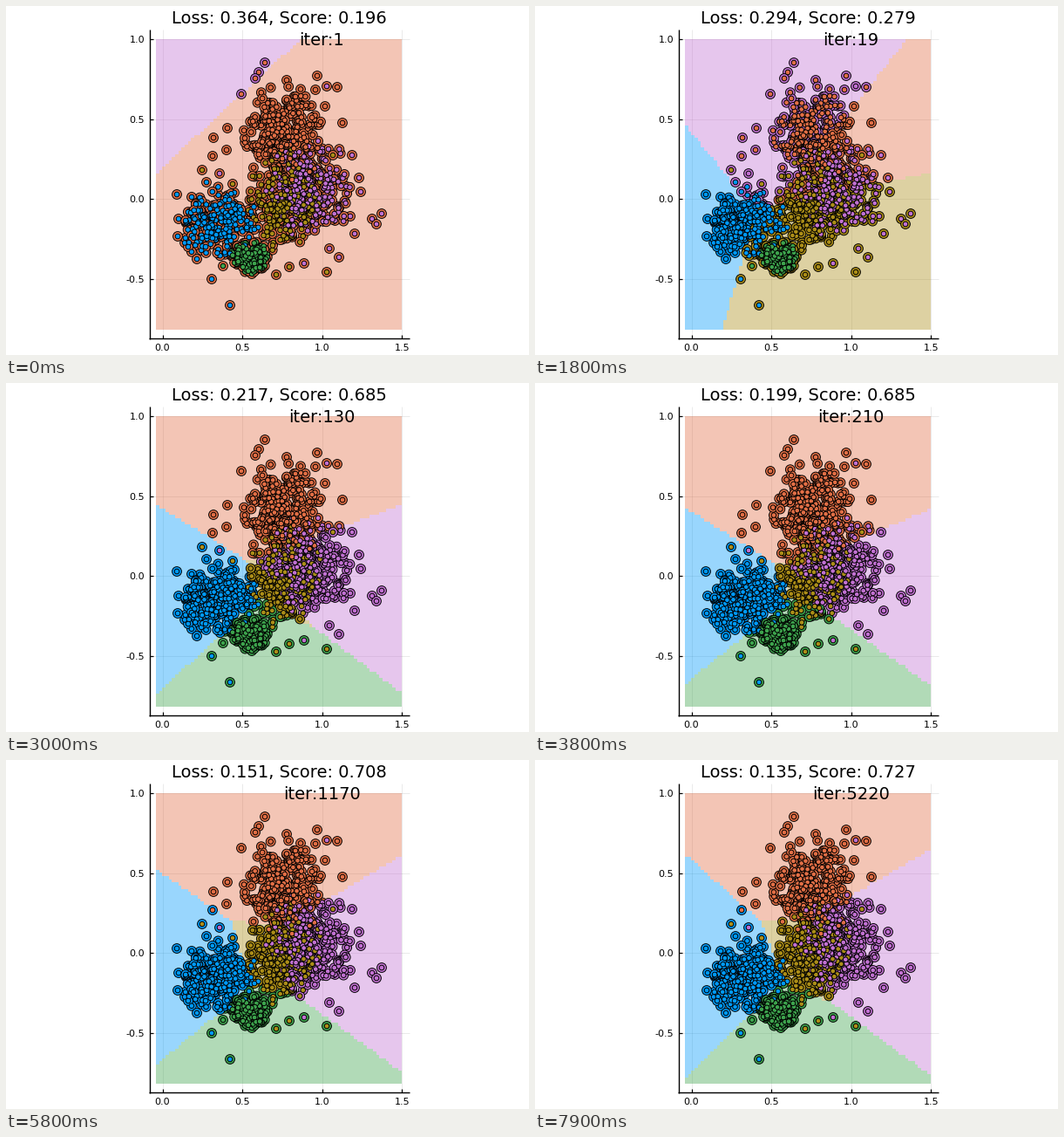
A matplotlib script that plays this animation: 600x400 px, repeating every 8000 ms.

```python
import numpy as np
import matplotlib.pyplot as plt
from matplotlib.animation import FuncAnimation
from matplotlib.colors import to_rgb

plt.rcParams["font.family"] = "DejaVu Sans"
W, H, DPI = 600, 400, 100
PT = 72 / DPI
X0, Y0, UNIT = 179.5, 221.3, 183.2
LEFT, RIGHT, TOP, BOTTOM = 172, 454, 38, 371

# Classes: blue, orange, green, purple, gold
COLORS = np.array([to_rgb(c) for c in
                   ("#009afa", "#e26f46", "#3da44d", "#c271d2", "#ac8e18")])

# Training log: iteration, loss, score
LOG = np.array([(1, .364, .196), (12, .313, .116), (60, .247, .686),
                (210, .199, .685), (1170, .151, .708), (3420, .137, .725),
                (5220, .135, .727)])

# Linear scores (x, y, bias) of orange, green, purple and gold per log entry; blue is 0
WEIGHTS = np.array([
    [(1, -.168, .5), (.6, -.35, -.2), (.444, .432, .381), (1.057, -.5, -.1)],
    [(1, -.168, -.307), (.6, -.35, -.45), (.455, .505, -.064), (1.057, -.503, -.411)],
    [(.748, 1.26, -.563), (.373, -.287, -.246), (1, .468, -.56), (.9755, .1795, -.546)],
    [(.737, 1.188, -.478), (.315, -.392, -.252), (1, .574, -.614), (.5, .3, -.276)],
    [(.6, .87, -.432), (.459, -.5445, -.364), (1, .1985, -.621), (.55, .15, -.268)],
    [(.708, .801, -.449), (.443, -.466, -.337), (1, .33, -.57), (.72, .25, -.36)],
    [(.7205, .8096, -.471), (.432, -.432, -.321), (1, .3365, -.582), (.75, .274, -.381)],
])

# Cluster centre, spread and size in stage pixels
CLUSTERS = [(243, 250, 22, 20, 200), (318, 148, 23, 27, 230), (279, 287, 10, 9, 195),
            (350, 210, 26, 28, 220), (318, 222, 22, 28, 195)]
STRAYS = [
    [(196, 216), (198, 244), (197, 264), (209, 276), (236, 313), (257, 343),
     (230, 202), (219, 290)],
    [(297, 65), (290, 76), (286, 83), (357, 80), (355, 96), (380, 93), (322, 85),
     (270, 101), (254, 140), (238, 151), (237, 172), (253, 165), (386, 134), (366, 115)],
    [(282, 307), (249, 298)],
    [(368, 92), (397, 171), (405, 197), (407, 213), (431, 238), (420, 244), (425, 250),
     (400, 261), (382, 288), (395, 241), (371, 278), (342, 295), (245, 192)],
    [(368, 305), (310, 308), (325, 299), (375, 171), (225, 188), (260, 204)],
]


def make_points():
    rng = np.random.default_rng(7)
    points, labels = [], []
    for k, (cx, cy, sx, sy, n) in enumerate(CLUSTERS):
        angle = rng.uniform(0, 2 * np.pi, n)
        radius = np.sqrt(-2 * np.log(1 - .9 * rng.random(n)))
        bulk = np.column_stack([cx + sx * radius * np.cos(angle),
                                cy + sy * radius * np.sin(angle)])
        points.append(np.vstack([bulk, STRAYS[k]]))
        labels += [k] * len(points[-1])
    order = rng.permutation(len(labels))
    return np.vstack(points)[order], np.array(labels)[order]


def features(px, py):
    return np.stack([(px - X0) / UNIT, (Y0 - py) / UNIT, np.ones_like(px)], axis=-1)


def classify(feats, weights):
    return np.argmax(feats @ np.vstack([np.zeros(3), weights]).T, axis=-1)


def iteration(frame):
    # Twenty frames each at steps of 1, 10, 50 and 200
    return sum(step * min(max(frame + 1 - 20 * i, 0), 20)
               for i, step in enumerate((1, 10, 50, 200)))


def blend(values, it):
    t = np.interp(np.log(it), np.log(LOG[:, 0]), np.arange(len(LOG)))
    i = min(int(t), len(LOG) - 2)
    return values[i] + (t - i) * (values[i + 1] - values[i])


points, labels = make_points()
point_features = features(points[:, 0], points[:, 1])
COLS, ROWS = 77, 91
cell_x = LEFT + (np.arange(COLS) + .5) * (RIGHT - LEFT) / COLS
cell_y = TOP + (np.arange(ROWS) + .5) * (BOTTOM - TOP) / ROWS
cell_features = features(*np.meshgrid(cell_x, cell_y))

fig = plt.figure(figsize=(W / DPI, H / DPI), dpi=DPI, facecolor="white")
ax = fig.add_axes([0, 0, 1, 1])
ax.axis("off")


def line(xs, ys, width=1.2, zorder=2, **style):
    ax.plot(xs, ys, color="black", lw=width * PT, zorder=zorder,
            solid_capstyle="butt", **style)


def text(x, y, s, size, ha="center"):
    return ax.text(x, y, s, fontsize=size, ha=ha, va="baseline", zorder=6)


for v in (0, .5, 1, 1.5):
    x = X0 + UNIT * v
    line([x, x], [27, 381], .8, 0, alpha=.1)
    line([x, x], [377, 381])
    text(x, 395, f"{v:.1f}", 8)
for v in (-.5, 0, .5, 1):
    y = Y0 - UNIT * v
    line([164.5, 463], [y, y], .8, 0, alpha=.1)
    line([164.5, 168.5], [y, y])
    text(159, y + 4, f"{v:.1f}", 8, "right")
line([164.5, 164.5], [27, 381.5], 1.4)
line([164, 463], [381, 381], 1.4)

regions = ax.imshow(np.ones((ROWS, COLS, 3)), extent=(LEFT, RIGHT, BOTTOM, TOP),
                    alpha=.4, interpolation="nearest", aspect="auto", zorder=1)


def dots(diameter, zorder):
    return ax.scatter(*points.T, s=(diameter * PT) ** 2, c=COLORS[labels],
                      edgecolors="black", linewidths=.95 * PT, zorder=zorder)


rings = dots(10.8, 3)
dots(5.6, 4)
title = text(313.7, 20, "", 14)
counter = text(362.5, 45, "", 14)
ax.set_xlim(0, W)
ax.set_ylim(H, 0)


def update(frame):
    it = iteration(frame)
    weights = blend(WEIGHTS, it)
    _, loss, score = blend(LOG, it)
    regions.set_data(COLORS[classify(cell_features, weights)])
    rings.set_facecolors(COLORS[classify(point_features, weights)])
    title.set_text(f"Loss: {loss:.3f}, Score: {score:.3f}")
    counter.set_text(f"iter:{it}")
    return regions, rings, title, counter


anim = FuncAnimation(fig, update, frames=80, interval=100, repeat=True, repeat_delay=0)
plt.show()
```
